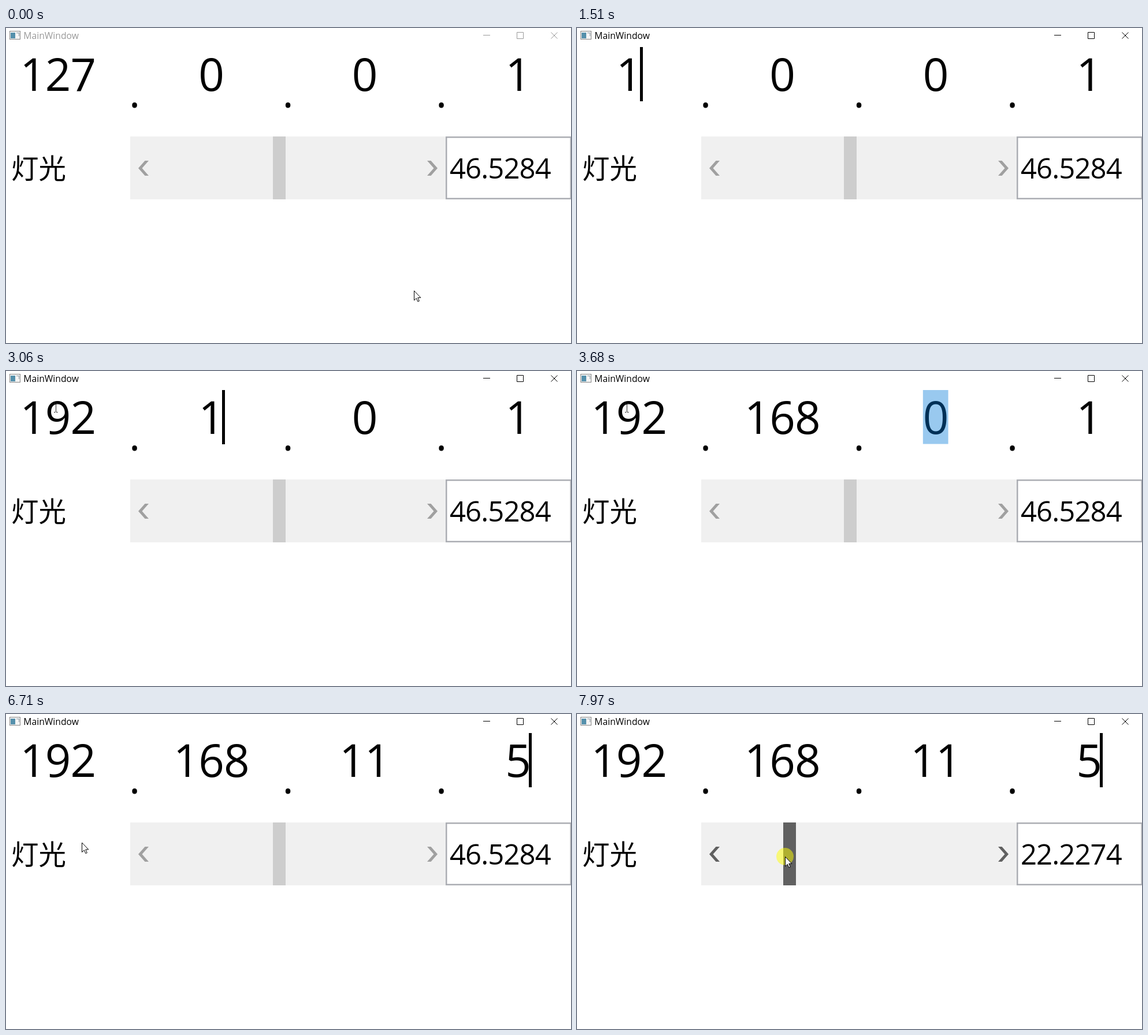
Write an HTML page that moves like this. It is 978x546 px and loops after 8000 ms.

```html
<!DOCTYPE html>
<html lang="zh">
<head>
<meta charset="utf-8">
<title>MainWindow</title>
<style>
  html, body { margin: 0; width: 100%; height: 100%; overflow: hidden; background: #fff; }
  svg { display: block; width: 978px; height: 546px; }
  text { font-family: "Open Sans", "Noto Sans", sans-serif; fill: #000; white-space: pre; }
  .big { font-size: 78px; text-anchor: middle; letter-spacing: -.9px; }
  .dot { font-size: 72px; text-anchor: middle; }
  .field { font-size: 49px; letter-spacing: -.9px; }
  .label { font-size: 47.5px; font-family: "Noto Sans CJK SC", "Noto Sans CJK", sans-serif; }
  .title { font-size: 15.7px; }
</style>
</head>
<body>
<svg viewBox="0 0 978 546">
  <g shape-rendering="crispEdges">
    <rect x="6.5" y="5.5" width="18" height="14" fill="#f4f4f4" stroke="#858585"/>
    <rect x="8" y="8" width="8" height="10" fill="#5490ab"/>
    <path d="M18 8.5h5M22.5 8v6" stroke="#8f9ca6" fill="none"/>
  </g>
  <text id="title" class="title" x="30.3" y="19">MainWindow</text>
  <path id="buttons" fill="none" d="M826 12.5h12M884.5 7.5h11v11h-11zM943.5 7.5l11 11M954.5 7.5l-11 11"/>

  <g id="cells"></g>

  <text class="label" x="9" y="261">灯光</text>
  <rect x="215" y="188" width="546" height="109" fill="#f0f0f0"/>
  <g id="chevrons">
    <path id="chevron" d="M240.5 256H247L235.5 243 247 230H240.5L229 243z"/>
    <use href="#chevron" transform="matrix(-1 0 0 1 976 0)"/>
  </g>
  <rect id="thumb" y="188" width="22" height="109"/>
  <rect x="762.25" y="189.25" width="215.5" height="106.5" fill="#fff" stroke="#abadb3" stroke-width="2.5"/>
  <text id="value" class="field" x="768" y="261"></text>

  <rect id="selection" y="33" height="93.5" fill="#0078d7" opacity=".4"/>
  <rect id="caret" y="33" width="5" height="94" shape-rendering="crispEdges"/>
  <circle id="press" r="15" fill="#ff0" opacity=".5"/>
  <path id="arrow" d="M.5 .5V17L4.3 13.4 6.9 19.2 9.3 18.1 6.8 12.4H11.8z" fill="#fff" stroke="#000"/>
  <path id="ibeam" d="M-3 -7.5h2.5M1 -7.5h2.5M.5 -7v14M-3 7.5h2.5M1 7.5h2.5" fill="none" stroke="#222"/>
</svg>
<script>
const LOOP = 8000, ADVANCE = 43.76, PITCH = 265.5;
const BAR = { left: 215, right: 761, top: 188, bottom: 297 };
const $ = id => document.getElementById(id);
const center = i => 89.7 + PITCH * i;

function addText(cls, x, y, content) {
  const el = document.createElementNS("http://www.w3.org/2000/svg", "text");
  el.setAttribute("class", cls);
  el.setAttribute("x", x);
  el.setAttribute("y", y);
  el.textContent = content;
  $("cells").append(el);
  return el;
}
const cells = [0, 1, 2, 3].map(i => addText("big", center(i), 108.5, ""));
[0, 1, 2].forEach(i => addText("dot", 222.5 + PITCH * i, 137.5, "."));

const at = (x, y, pointer = "arrow") => ({ x, y, pointer });
const type = (cell, text) => ({ ["c" + cell]: text, focus: cell, selected: false, caret: true });
const select = cell => ({ focus: cell, selected: true, caret: false });
const drag = x => ({ ...at(x + 3, 247), thumb: x });

const start = {
  c0: "127", c1: "0", c2: "0", c3: "1", thumb: 462, active: false,
  focus: 0, selected: false, caret: false, pressed: false, ...at(706, 455)
};

// [time, changes]
const steps = [
  [70, at(692, 446)],
  [140, at(620, 398)],
  [220, at(490, 318)],
  [290, at(352, 232)],
  [370, at(232, 156)],
  [440, at(150, 102, "ibeam")],
  [520, at(104, 74, "ibeam")],
  [590, { ...at(86, 64, "ibeam"), active: true, pressed: true }],
  [660, select(0)],
  [740, { pressed: false }],
  [1430, { ...type(0, "1"), pointer: "none" }],
  [1580, type(0, "19")],
  [1810, type(0, "192")],
  [2350, { caret: false }],
  [2670, select(1)],
  [2750, { pointer: "ibeam" }],
  [3060, type(1, "1")],
  [3150, type(1, "16")],
  [3360, type(1, "168")],
  [3680, select(2)],
  [3930, type(2, "1")],
  [4140, type(2, "11")],
  [4690, select(3)],
  [5700, type(3, "5")],
  [6250, { caret: false }],
  [6560, at(90, 84, "ibeam")],
  [6630, at(106, 152)],
  [6710, { ...at(131, 222.5), caret: true }],
  [6790, at(184, 250)],
  [6870, at(262, 258)],
  [6940, at(338, 256)],
  [7020, at(400, 252)],
  [7100, at(440, 249)],
  [7180, at(462, 247)],
  [7260, { ...at(470, 246), caret: false }],
  [7400, at(467, 246)],
  [7490, at(464, 246)],
  [7640, { ...drag(462), pressed: true }],
  [7720, drag(443)],
  [7800, { ...drag(412), caret: true }],
  [7890, drag(380)],
  [7970, drag(357)]
];

const set = (id, name, value) => $(id).setAttribute(name, value);
const show = (id, on) => set(id, "visibility", on ? "visible" : "hidden");

function draw(time) {
  const s = Object.assign({}, start, ...steps.filter(p => p[0] <= time).map(p => p[1]));
  const chrome = s.active ? "#000" : "#999";
  set("title", "style", "fill:" + chrome);
  set("buttons", "stroke", chrome);

  cells.forEach((el, i) => { el.textContent = s["c" + i]; });
  const half = s["c" + s.focus].length * ADVANCE / 2;
  const mid = center(s.focus);
  set("selection", "x", mid - half);
  set("selection", "width", half * 2);
  show("selection", s.selected);
  set("caret", "x", mid + half - 2.9);
  show("caret", s.caret);

  const hover = s.pointer === "arrow" && s.x >= BAR.left && s.x < BAR.right &&
    s.y >= BAR.top && s.y < BAR.bottom;
  const onThumb = hover && s.x >= s.thumb && s.x < s.thumb + 22;
  set("chevrons", "fill", hover ? "#606060" : "#a0a0a0");
  set("thumb", "fill", onThumb ? (s.pressed ? "#606060" : "#a6a6a6") : "#cdcdcd");
  set("thumb", "x", s.thumb);
  $("value").textContent = (46.5284 - (462 - s.thumb) * 24.301 / 105).toFixed(4);

  const place = `translate(${s.x} ${s.y})`;
  ["press", "arrow", "ibeam"].forEach(id => set(id, "transform", place));
  show("press", s.pressed);
  show("arrow", s.pointer === "arrow");
  show("ibeam", s.pointer === "ibeam");
}

const origin = performance.now();
function tick() {
  draw((performance.now() - origin) % LOOP);
  requestAnimationFrame(tick);
}
tick();
</script>
</body>
</html>
```
